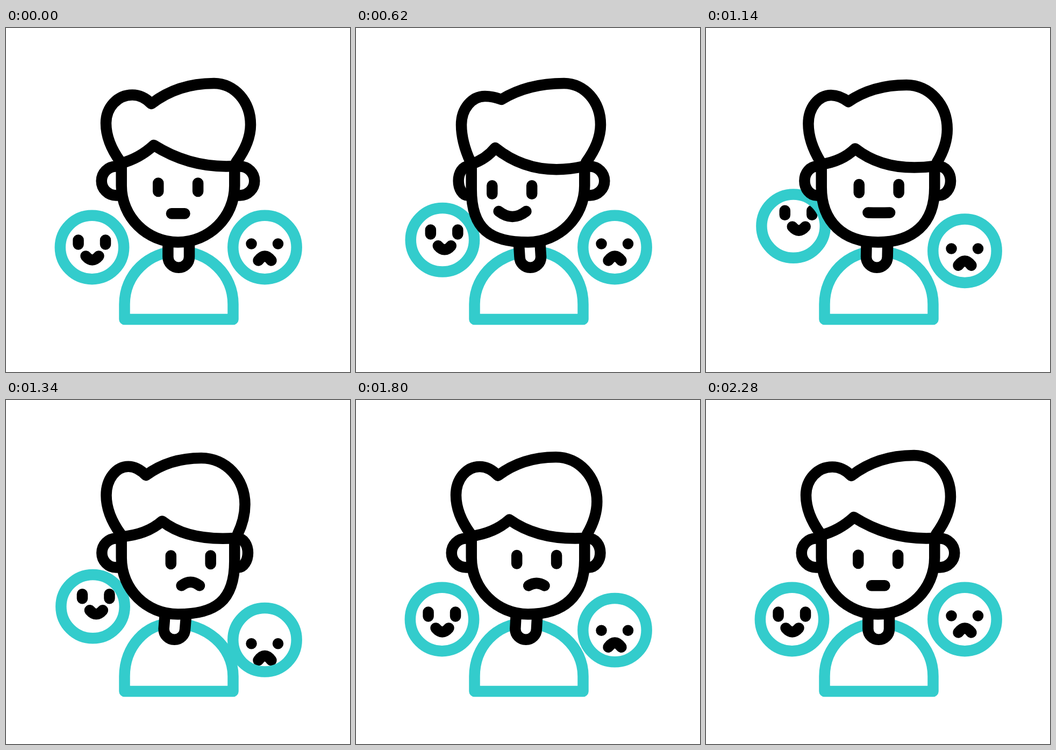
Write an HTML page with a canvas that moves like this. It is 640 px wide and 640 px high and loops after 2.4 s.

```html
<!DOCTYPE html>
<html lang="en">
<head>
<meta charset="utf-8">
<title>Mood swing</title>
<style>
  html, body { margin: 0; width: 100%; height: 100%; overflow: hidden; background: #fff; }
  canvas { display: block; width: 640px; height: 640px; }
</style>
</head>
<body>
<canvas id="stage" width="640" height="640"></canvas>
<script>
const ctx = document.getElementById('stage').getContext('2d');
const LOOP = 2400, STEP = 20;
const TEAL = '#33cccc', BLACK = '#000', LINE = 20.5;
const ROUND = 0.56; // handle length of a quarter ellipse

const clamp = v => Math.max(0, Math.min(1, v));
const smooth = u => u * u * (3 - 2 * u);
const span = (t, a, b) => clamp((t - a) / (b - a));
// smoothstep with a longer tail
const settle = (u, k) => smooth(1 - Math.pow(1 - u, k));
const bump = (t, a, peak, b) =>
  t < peak ? smooth(span(t, a, peak)) : 1 - smooth(span(t, peak, b));

// How far the head is in its happy (left) and sad (right) pose
function headTurn(t) {
  const toLeft = settle(span(t, 0, 640), 1.2);
  const toRight = settle(span(t, 857, 1451), 1.2);
  const back = settle(span(t, 1560, 2280), 1.38);
  return { happy: toLeft * (1 - toRight), sad: toRight * (1 - back) };
}

function shape(color, build, fill) {
  ctx.beginPath();
  build();
  if (fill) { ctx.fillStyle = fill; ctx.fill(); }
  ctx.strokeStyle = color;
  ctx.stroke();
}

function pill(x, y, half) {
  ctx.moveTo(x, y - half);
  ctx.lineTo(x, y + half + 0.01);
}

function eyePair(x, y, gap, half) {
  pill(x - gap / 2, y, half);
  pill(x + gap / 2, y, half);
}

function smile(x, y, half, depth) {
  ctx.moveTo(x - half, y);
  ctx.quadraticCurveTo(x, y + 2 * depth, x + half, y);
}

// Quarter ellipse that leaves upright and arrives level, or the reverse
function quarter(x0, y0, x1, y1, uprightFirst) {
  const dx = (x1 - x0) * ROUND, dy = (y1 - y0) * ROUND;
  if (uprightFirst) ctx.bezierCurveTo(x0, y0 + dy, x1 - dx, y1, x1, y1);
  else ctx.bezierCurveTo(x0 + dx, y0, x1, y1 - dy, x1, y1);
}

function bubble(x, y, faceX, faceY, drawFace) {
  ctx.save();
  ctx.translate(faceX, faceY);
  shape(BLACK, drawFace);
  ctx.restore();
  shape(TEAL, () => ctx.arc(x, y, 59.2, 0, Math.PI * 2));
}

function happyFace() {
  eyePair(-0.2, -9.5, 50.5, 4);
  smile(0.5, 16.4, 12, 7);
}

function sadFace() {
  eyePair(-0.2, -6.5, 49.5, 0);
  smile(0, 24.6, 12, -8.2);
}

function shirt(top) {
  ctx.moveTo(220.5, 542);
  ctx.lineTo(220.5, 514);
  quarter(220.5, 514, top, 415.5, true);
  quarter(top, 415.5, 422.5, 514, false);
  ctx.lineTo(422.5, 542);
  ctx.closePath();
}

function neck(top, low) {
  ctx.moveTo(top - 19.8, 398);
  ctx.arc(low, 426, 19.8, Math.PI, 0, true);
  ctx.lineTo(top + 19.8, 398);
}

function ear(side, width) {
  const base = 320 + side * 105.3, x = base + side * 10 * width;
  ctx.moveTo(base, 257.5);
  ctx.ellipse(x, 284.5, 27 * width, 27, 0, -Math.PI / 2, Math.PI / 2, side < 0);
  ctx.lineTo(base, 311.5);
}

// One half of the jaw; a turned head squares the cheek it turns to
function cheek(side, square) {
  const x = 320 + side * 105.3;
  ctx.moveTo(x, 256);
  ctx.lineTo(x, 293.5 + 6.5 * square);
  ctx.bezierCurveTo(x, 351.5 + 23.5 * square,
    320 + side * (58 + 12 * square), 398.5, 320, 398.5);
}

function hair(at) {
  const lobe = { x: at(186, 10, 0), y: at(177, 3, 0) };
  const tuft = { x: at(235, 5, -8), y: at(124.5, 2.5, -1) };
  const notch = { x: at(270.5, 0, -10.5), y: at(141, -8, -0.5) };
  const crown = { x: at(387, 0, -25), y: at(103, 0, 5.3) };
  const side = { x: at(455, 0, -11), y: at(180, 0, 15) };

  ctx.moveTo(213, 249);
  ctx.quadraticCurveTo(lobe.x, 212, lobe.x, lobe.y);
  quarter(lobe.x, lobe.y, tuft.x, tuft.y, true);
  ctx.quadraticCurveTo(notch.x - 16, tuft.y, notch.x, notch.y);
  ctx.quadraticCurveTo(notch.x + 0.42 * (crown.x - notch.x), crown.y, crown.x, crown.y);
  quarter(crown.x, crown.y, side.x, side.y, false);
  ctx.quadraticCurveTo(side.x, at(213, 0, 9), at(428, 0, 3), 250);
}

function fringe(at) {
  ctx.moveTo(at(213, 2, 0), at(252, 1, 2.5));
  ctx.quadraticCurveTo(at(248, -6, 14), at(243, 1, 8.5), at(275, -16, 17), at(218, 5, 7.5));
  ctx.quadraticCurveTo(at(344, -15, -6), at(261.5, 17.5, 0), 425, 257);
}

function draw(t) {
  const { happy, sad } = headTurn(t);
  const at = (rest, toHappy, toSad) => rest + toHappy * happy + toSad * sad;

  ctx.fillStyle = '#fff';
  ctx.fillRect(0, 0, 640, 640);
  ctx.lineWidth = LINE;
  ctx.lineCap = ctx.lineJoin = 'round';

  shape(TEAL, () => shirt(at(321.5, 8.5, -12.5)));

  const up = 42 * bump(t, 360, 1040, 1700);
  const down = 49 * bump(t, 1040, 1470, 2060);
  bubble(160 + up * 0.065, 408 - up, 160 + up * 0.31, 408 - up * 1.39, happyFace);
  bubble(481.5, 408 + down, 481.5, 408 + down * 1.35, sadFace);

  shape(BLACK, () => neck(at(321.2, 1.3, -5.9), at(321.2, 3.1, -8.4)), '#fff');
  shape(BLACK, () => ear(-1, 1 - 0.35 * happy), '#fff');
  shape(BLACK, () => ear(1, 1 - 0.35 * sad), '#fff');
  shape(BLACK, () => { cheek(-1, happy); cheek(1, sad); }, '#fff');
  shape(BLACK, () => hair(at), '#fff');
  shape(BLACK, () => fringe(at));
  shape(BLACK, () => {
    eyePair(at(320.2, -30, 26.3), at(296.3, 4.7, 0.7), 73.9, 7.8);
    smile(at(320.2, -29.2, 25.8), at(345.2, -4.2, 0.3), at(12.3, 13.2, 4), at(0, 10, -7.5));
  });
}

const start = performance.now();
function tick() {
  const t = (performance.now() - start) % LOOP;
  draw(Math.floor(t / STEP) * STEP);
  requestAnimationFrame(tick);
}
tick();
</script>
</body>
</html>
```
